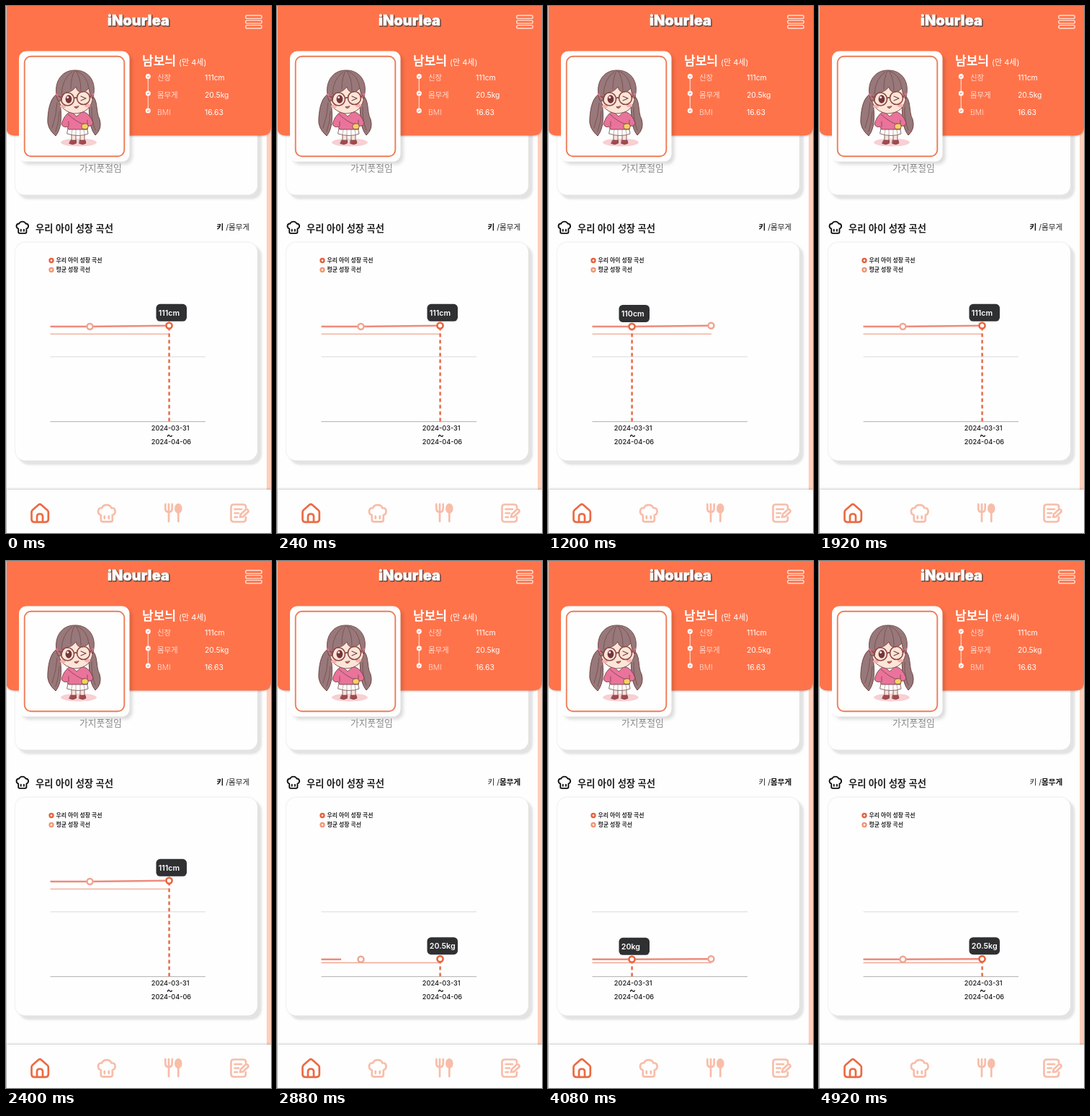
Write an HTML page that moves like this. It is 368 px wide and 730 px high and loops after 5.04 s.

```html
<!DOCTYPE html>
<html lang="ko">
<head>
<meta charset="utf-8">
<title>성장 곡선</title>
<style>
  html, body { margin: 0; width: 100%; height: 100%; overflow: hidden; background: #fefefe; }
  svg { display: block; width: 368px; height: 730px; font-family: Inter, "Noto Sans CJK KR", "Noto Sans CJK", sans-serif; }
  .card { fill: #fefefe; filter: drop-shadow(5px 5px 1.5px #e3e3e3) drop-shadow(0 0 1px #dadada); }
  .icon { fill: none; stroke-width: 2.7; stroke-linecap: round; stroke-linejoin: round; }
  .pale { stroke: #f8bda9; }
  .main { fill: none; stroke: #ef8b7c; stroke-width: 2.5; }
  .average { stroke: #efa693; stroke-width: 1.3; }
  .ring { fill: #fff; stroke: #f0a592; stroke-width: 2.5; }
  .active { stroke: #e8663f; }
  .dash { stroke: #e8714e; stroke-width: 2.6; stroke-dasharray: 5 4; }
  .tip { fill: #2f3032; }
  .value { fill: #fff; font-size: 10.7px; font-weight: 600; }
  .legend { font-size: 7.9px; font-weight: 600; fill: #2a2a2a; }
  .date { font-size: 9.2px; font-weight: 500; fill: #181818; }
  .stat { fill: #fff; font-size: 10.4px; }
  .stat .label { font-weight: 300; opacity: .75; }
  .toggle { font-size: 10.6px; font-weight: 400; fill: #222; }
  .toggle .on { font-weight: 600; fill: #111; }

  .height, .weight, .pin { animation: 5040ms step-end infinite; }
  .height { animation-name: height; }
  .weight { animation-name: weight; }
  .height-right { animation-name: height-right; }
  .height-left { animation-name: height-left; }
  .weight-right { animation-name: weight-right; }
  .weight-left { animation-name: weight-left; }
  .draw { stroke-dasharray: 1 2; animation: draw 5040ms linear infinite; }

  @keyframes height { 0% { visibility: visible } 50%, 100% { visibility: hidden } }
  @keyframes weight { 0% { visibility: hidden } 50%, 100% { visibility: visible } }
  @keyframes height-right { 0%, 38.095% { visibility: visible } 19.047%, 50%, 100% { visibility: hidden } }
  @keyframes height-left { 0%, 38.095%, 100% { visibility: hidden } 19.047% { visibility: visible } }
  @keyframes weight-right { 0%, 64.285% { visibility: hidden } 50%, 95.238%, 100% { visibility: visible } }
  @keyframes weight-left { 0%, 95.238%, 100% { visibility: hidden } 64.285% { visibility: visible } }
  @keyframes draw {
    0%, 50% { stroke-dashoffset: 1; animation-timing-function: cubic-bezier(.34, 0, .66, 1) }
    77.4%, 100% { stroke-dashoffset: 0 }
  }
</style>
</head>
<body>
<svg viewBox="0 0 368 730">
  <defs>
    <path id="hat" d="M5 16.5V23Q5 25.5 7.5 25.5H18.5Q21 25.5 21 23V16.5C27 14 25.5 6 19.5 6.5C17.5 1 8.5 1 6.5 6.5C.5 6-1 14 5 16.5M10 21V18M16 21V18"/>
    <g id="dates" class="date">
      <text x="-24.7" y="587.8">2024-03-31</text>
      <text x="1" y="598.5" text-anchor="middle" font-size="14">~</text>
      <text x="-24.7" y="606.8">2024-04-06</text>
    </g>
    <rect id="tip" class="tip" x="-18" y="-30" width="42.5" height="24" rx="5.5"/>
    <circle id="spot" class="ring active" r="4"/>
    <g id="bullet">
      <circle r="3.5" fill="#fff"/>
      <path d="M-1.4 0L-.3 1.1L1.5-1" fill="none" stroke="#ff734a"/>
    </g>
  </defs>

  <rect width="368" height="730" fill="#fefefe"/>
  <rect x="362" y="165" width="6" height="505" fill="#ffcfbb"/>

  <rect class="card" x="13" y="150" width="336" height="111.5" rx="13"/>
  <text x="102" y="228.5" font-size="12.8" font-weight="300" fill="#8c8c8c">가지풋절임</text>

  <!-- header -->
  <path d="M0 0H368V167Q368 179.5 355 179.5H13Q0 179.5 0 167Z" fill="#ff734a" style="filter:drop-shadow(0 1px 1px #0003)"/>
  <path d="M.5 0V730" stroke="#c4c4c4"/>
  <g font-size="20" font-weight="900" stroke-linejoin="round">
    <text x="142" y="28" fill="#69443a" stroke="#69443a" stroke-width="1.6">iNourlea</text>
    <text x="141" y="27" fill="#fff" stroke="#fff" stroke-width=".5">iNourlea</text>
  </g>
  <g fill="none" stroke="#ffe1d6" stroke-width="1.3">
    <rect x="332.7" y="13" width="22.6" height="4.4" rx="2.2"/>
    <rect x="332.7" y="19.8" width="22.6" height="4.4" rx="2.2"/>
    <rect x="332.7" y="26.6" width="22.6" height="4.4" rx="2.2"/>
  </g>
  <text x="189" y="82" font-size="17" font-weight="700" fill="#fff">남보늬</text>
  <text x="240" y="82" font-size="11" fill="#fff">(만 4세)</text>
  <path d="M197.3 98V145" stroke="#ffd9cb" stroke-width="1.2"/>
  <use href="#bullet" x="197.3" y="97.5"/>
  <use href="#bullet" x="197.3" y="121"/>
  <use href="#bullet" x="197.3" y="145"/>
  <g class="stat">
    <text class="label" x="210" y="103">신장</text><text x="276" y="103">111cm</text>
    <text class="label" x="210" y="127.3">몸무게</text><text x="276" y="127.3">20.5kg</text>
    <text class="label" x="210" y="151.3">BMI</text><text x="276" y="151.3">16.63</text>
  </g>

  <!-- portrait -->
  <rect x="18" y="62.5" width="153.5" height="153" rx="10" fill="#fefefe" style="filter:drop-shadow(4px 4px 2px #0002)"/>
  <rect x="25.7" y="69.7" width="138.6" height="138.6" rx="9" fill="#fefefe" stroke="#ee7c58" stroke-width="1.9"/>
  <g stroke="#6f4643" stroke-linecap="round" stroke-linejoin="round">
    <ellipse cx="101" cy="189" rx="25" ry="5.5" fill="#f8cfd2" stroke="none"/>
    <path d="M73 121C62 125 59 141 58 155Q56 169 69 180C77 170 78 154 75 134Z" fill="#98787a"/>
    <path d="M118 123C129 129 124 146 130 157Q134 170 124 179C115 168 116 151 115 138Z" fill="#98787a"/>
    <path d="M64 169Q70 152 71 134M69 174Q74 160 74 146M124 172Q118 157 119 140" fill="none" stroke-width=".7"/>
    <path d="M91 178V187H97V178M103 178V187H109V178" fill="#fbe3d7" stroke-width=".8"/>
    <path d="M90 186H97.5V190Q93 193 88 190.5ZM102.5 186H110L111 190Q107 193 102 190.5Z" fill="#a94751" stroke-width=".8"/>
    <path d="M87 166H112L114 177Q101 182 85 177Z" fill="#fff" stroke-width=".8"/>
    <path d="M92 171L91 178M97 171V179M103 171V179M108 171L109 178" fill="none" stroke="#a3898a" stroke-width=".7"/>
    <path d="M88 147Q80 152 77 164Q80 169 85 167L87 171H113L114 166Q120 167 121 162Q117 150 109 147Z" fill="#ea739b" stroke-width=".9"/>
    <path d="M92 147L98 153L105 147Z" fill="#fff" stroke-width=".8"/>
    <path d="M86 150Q98 161 108 164M87 160V167M113 158V166" fill="none" stroke-width=".8"/>
    <rect x="105" y="163" width="9" height="7.5" rx="3" fill="#f8cf61" stroke-width=".8"/>
    <path d="M73 118Q70 144 94 149Q119 149 121 124Q118 102 96 103Z" fill="#fde5d8" stroke-width=".9"/>
    <path d="M72 131C64 108 76 89 95 89C115 88 128 106 120 129Q116 123 115 114Q110 120 102 119Q98 117 97 112Q92 119 83 120Q78 123 77 131Z" fill="#98787a" stroke-width=".9"/>
    <path d="M95 90Q90 99 90 115M97 90Q104 99 104 117M98 90Q113 96 115 114M92 91Q78 101 77 122" fill="none" stroke-width=".7"/>
    <path d="M70 122L74 127M117 126L121 122" stroke="#de718e" stroke-width="2.5"/>
    <g stroke="none" fill="#f6b2ac">
      <ellipse cx="79" cy="139" rx="4" ry="2.3"/><ellipse cx="113" cy="138" rx="4" ry="2.3"/>
    </g>
    <ellipse cx="87" cy="129" rx="4.4" ry="5.8" fill="#74363b" stroke="none"/>
    <circle cx="85.7" cy="126.5" r="1.5" fill="#fff" stroke="none"/>
    <path d="M104 125L111 128L104 131" fill="none" stroke-width="1.2"/>
    <g fill="none" stroke="#8d4946" stroke-width="1.6">
      <circle cx="85.5" cy="129" r="9"/><circle cx="107.5" cy="127.5" r="9"/>
      <path d="M94.5 128Q96.5 126 98.5 127.5M76.5 127L73 125M116.5 126L119 124"/>
    </g>
    <path d="M95 140Q98 144 101 139Z" fill="#d75c61" stroke-width=".8"/>
  </g>

  <!-- chart card -->
  <use href="#hat" class="icon" stroke="#111" transform="translate(13.7 297) scale(.7)"/>
  <text x="41" y="313" font-size="13.3" font-weight="600" fill="#222">우리 아이 성장 곡선</text>
  <text class="toggle height" x="292.5" y="310"><tspan class="on">키</tspan> /몸무게</text>
  <text class="toggle weight" x="292.5" y="310">키 /<tspan class="on">몸무게</tspan></text>

  <rect class="card" x="13" y="327.5" width="336" height="302" rx="14"/>
  <circle cx="63" cy="352.5" r="2.5" fill="#fff" stroke="#e46340" stroke-width="2.4"/>
  <circle cx="63" cy="365.5" r="2.5" fill="#fff" stroke="#f39676" stroke-width="2.4"/>
  <text class="legend" x="69.5" y="355.3">우리 아이 성장 곡선</text>
  <text class="legend" x="69.5" y="368.3">평균 성장 곡선</text>
  <path d="M61.5 485.8H277" stroke="#e1e1e1" stroke-width="1.2"/>
  <path d="M61.5 575.6H277" stroke="#bdbdbd" stroke-width="1.3"/>

  <g class="height">
    <path class="average" d="M61.5 454.3H227"/>
    <path class="main" d="M61.5 444H116.5L226.5 442.8"/>
    <circle class="ring" cx="116.5" cy="444" r="4"/>
    <circle class="ring" cx="226.5" cy="442.8" r="4"/>
  </g>
  <g class="weight">
    <path class="average" d="M61.5 556.5H227"/>
    <path class="main draw" pathLength="1" d="M61.5 551.8H116.5L226.5 551.2"/>
    <circle class="ring" cx="116.5" cy="551.8" r="4"/>
    <circle class="ring" cx="226.5" cy="551.2" r="4"/>
  </g>

  <g class="pin height-right">
    <path class="dash" d="M226.6 575.5V446"/>
    <use href="#spot" x="226.5" y="442.8"/>
    <use href="#tip" x="226.5" y="442.8"/>
    <text class="value" x="211.8" y="428.6">111cm</text>
    <use href="#dates" x="226.5"/>
  </g>
  <g class="pin height-left">
    <path class="dash" d="M116.6 575.5V447"/>
    <use href="#spot" x="116.5" y="444"/>
    <use href="#tip" x="116.5" y="444"/>
    <text class="value" x="101.8" y="429.8">110cm</text>
    <use href="#dates" x="116.5"/>
  </g>
  <g class="pin weight-right">
    <path class="dash" d="M226.6 575.5V555"/>
    <use href="#spot" x="226.5" y="551.2"/>
    <use href="#tip" x="226.5" y="551.2"/>
    <text class="value" x="211.8" y="537">20.5kg</text>
    <use href="#dates" x="226.5"/>
  </g>
  <g class="pin weight-left">
    <path class="dash" d="M116.6 575.5V555"/>
    <use href="#spot" x="116.5" y="551.8"/>
    <use href="#tip" x="116.5" y="551.8"/>
    <text class="value" x="101.8" y="537.6">20kg</text>
    <use href="#dates" x="116.5"/>
  </g>

  <!-- navigation -->
  <rect x="1" y="670" width="367" height="62" fill="#fefefe" style="filter:drop-shadow(0 -1px 1.5px #0003)"/>
  <path class="icon" stroke="#ec6a42" d="M35.5 701Q35.5 699.5 37 698L45 691Q47 689.3 49 691L57 698Q58.8 699.5 58.8 701V711Q58.8 714.8 55 714.8H39Q35.5 714.8 35.5 711ZM43 714V707Q43 703.5 47 703.5T51 707V714"/>
  <use href="#hat" class="icon pale" transform="translate(126.8 688.8)"/>
  <path class="icon pale" stroke-width="3" d="M221.3 690V696Q221.3 701 226 701T230.7 696V690M226 690V714M239.3 702V714"/>
  <ellipse cx="239.3" cy="696" rx="5.3" ry="7" fill="#f8bda9"/>
  <path class="icon pale" d="M333 695V693Q333 690.5 329 690.5H316.5Q312.5 690.5 312.5 694.5V710.5Q312.5 714.5 316.5 714.5H329Q333 714.5 333 710.5V708M317.5 697H327M317.5 702.5H323M317.5 708H321M325 708L326 704L333.5 697Q337 697.5 336.5 700.5L329 707.5Z"/>
</svg>
</body>
</html>
```
